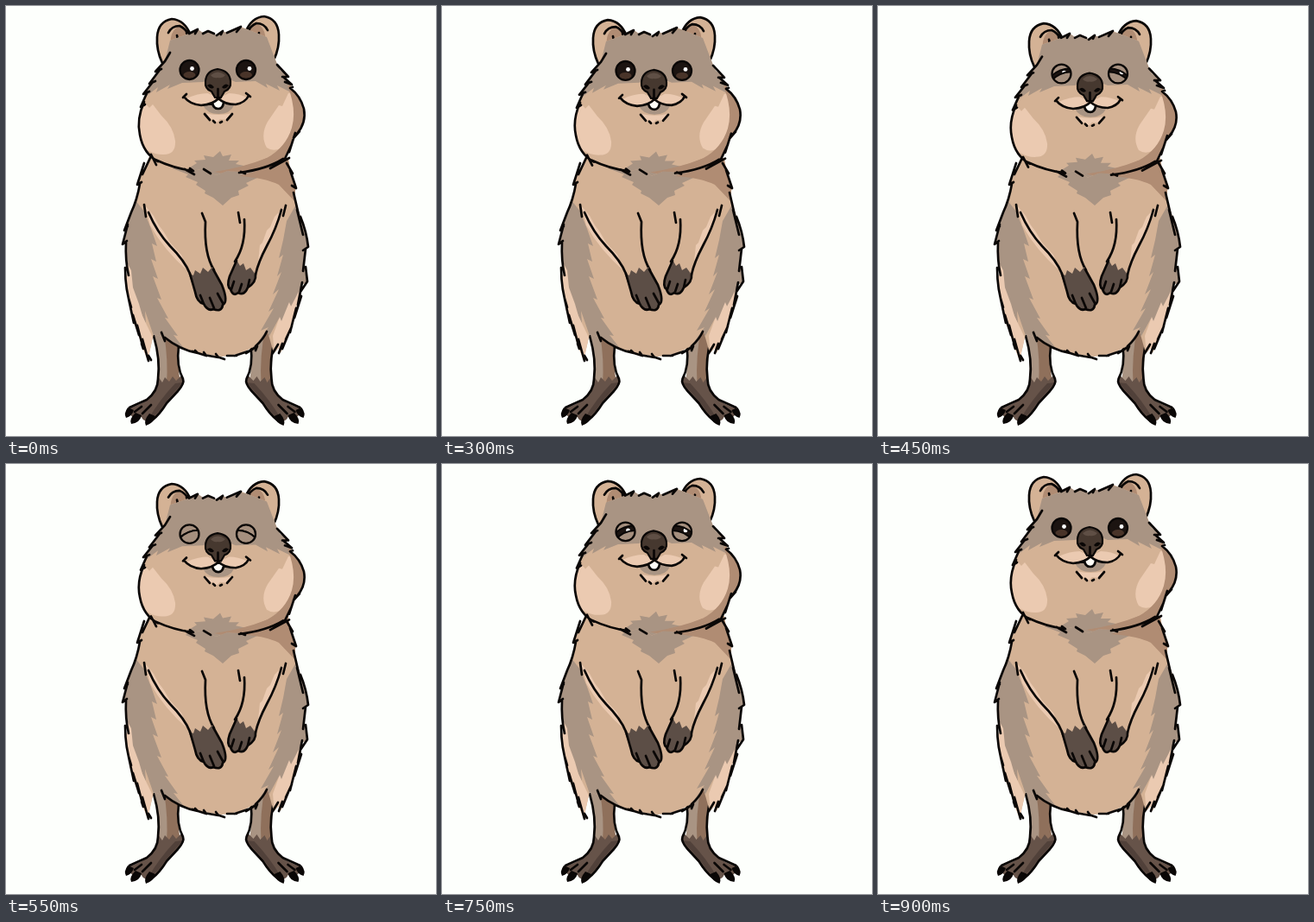
These frames come from a looping animation (498x498 px, 950 ms). An HTML page:

```html
<!DOCTYPE html>
<html lang="en">
<head>
<meta charset="utf-8">
<title>Blinking quokka</title>
<style>
  html, body { margin: 0; width: 100%; height: 100%; overflow: hidden; background: #fdfffc; }
  svg { display: block; width: 100vw; height: 100vh; }
  .ink { fill: none; stroke: #0a0706; stroke-width: 2.7; stroke-linecap: round; stroke-linejoin: round; }
  .tan { fill: #d4b295; }
  .grey { fill: #a99483; }
  .pink { fill: #ebcab1; }
  .shade { fill: #b08c73; }
  .dusk { fill: #8f705b; }
  .paw { fill: #5c4e46; }
  .foot { fill: #665349; }
  .sole { fill: #51413a; }
  .lid { fill: #a58f7e; stroke: #0a0706; stroke-width: 2; }
</style>
</head>
<body>
<svg viewBox="0 0 498 498">
  <defs>
    <path id="trunk" d="M167 172L157 196L151 207L155 206Q152 224 145 239L137 258L140 257L135 275L139 273Q138 295 141 310L139 313Q139 331 144 344L143 349L148 367L153 379L158 395L164 410L171 380L183 384Q205 402 250 406Q288 403 303 377L310 402L316 396L318 402L324 387L328 379L333 366L335 350L341 338L342 323L349 320L345 301L347 282L350 279Q348 261 340 241L334 221L336 208L329 189L327 176Z"/>
    <path id="skull" d="M184 64L173 75L178 74L166 89L171 88L160 101L164 101L156 116L160 115Q153 129 154 145Q155 169 176 180Q193 188 216 191L230 188L243 196L256 191L274 192Q304 188 321 179L332 158L334 149L339 147Q347 135 345 120Q341 104 329 95L331 91L323 85L327 82L317 74L313 65L302 36L272 24L256 31L250 29L245 34L233 29L228 31L222 27L212 32L190 40Z"/>
    <clipPath id="inTrunk"><use href="#trunk"/></clipPath>
    <clipPath id="inSkull"><use href="#skull"/></clipPath>
    <clipPath id="inEye"><circle r="11.4"/></clipPath>

    <path id="shin" d="M169 366Q178 407 175 438L202 438Q198 415 200 392V366Z"/>
    <g id="foot">
      <path class="foot" d="M176 429L181 436L184 430L189 435L193 429L197 434L203 428L206 436Q197 450 186 461Q176 478 168 480Q159 482 157 476Q147 479 144 473Q137 472 142 466Q169 458 174 441Z"/>
      <path class="sole" d="M205 436Q193 449 183 461Q175 475 165 478Q178 456 196 437Z"/>
      <path class="ink" d="M171 382Q179 410 176 432Q176 446 163 456L143 465M200 394Q197 417 205 432Q207 437 199 446L186 460Q178 473 169 480M158 472L168 462M149 470L157 464"/>
      <path d="M141 465Q136 472 139 477Q146 475 148 468ZM150 471Q142 479 145 484Q155 483 157 474ZM166 472Q159 480 162 486Q171 483 173 475Z" fill="#0a0706"/>
    </g>

    <g id="ear">
      <path class="tan" d="M182 67Q174 52 175 36Q176 19 192 15Q207 16 214 35L204 55Z"/>
      <path class="shade" d="M193 58Q186 32 199 24Q208 25 213 38L207 50Z"/>
      <path class="ink" d="M181 66Q174 51 175 36Q176 18 192 15Q207 16 214 34M188 31Q192 23 201 23Q208 26 211 33M198 34L200 44M204 39L207 50M209 31L214 42"/>
    </g>
  </defs>

  <rect width="498" height="498" fill="#fdfffc"/>

  <use href="#shin" class="grey"/>
  <path class="dusk" d="M183 380Q188 410 186 438H202Q198 415 200 392V380Z"/>
  <use href="#foot"/>
  <g transform="matrix(-1 0 0 1 483.5 0)">
    <use href="#shin" class="grey"/>
    <path class="dusk" d="M169 366Q178 407 175 438H188Q190 405 183 372Z"/>
    <use href="#foot"/>
  </g>

  <use href="#trunk" class="tan"/>
  <g clip-path="url(#inTrunk)">
    <path class="grey" d="M150 225L160 238L168 258L175 278L169 275L174 296L168 293L176 316L170 313L180 340L175 338L188 362L184 361L199 382L194 381L212 404L184 385L171 382L161 353L162 368L150 340L152 349L141 323L132 315L133 255Z"/>
    <path class="pink" d="M134 286L145 306L147 326L154 345L158 359L170 384L165 412L135 400Z"/>
    <path class="grey" d="M336 230L325 249L321 271L316 292L321 288L314 313L319 308L309 334L316 328L304 354L310 350L295 376L304 372L282 403L304 384L316 362L316 376L330 346L331 357L354 325V245Z"/>
    <path class="pink" d="M343 323L330 348L328 343L319 365L317 360L309 382L311 405L334 381Z"/>
    <path class="grey" d="M192 188L211 195L208 198L222 204L220 207L231 214L230 217L240 222L251 231L261 222L270 219L269 214L281 208L278 205L302 194L310 183Z"/>
    <path class="shade" d="M270 197Q300 199 316 207L337 229L334 205L326 176Q307 187 270 197Z"/>
    <path class="pink" d="M161 231L171 243L177 254L183 262L190 274L203 288L212 308Q183 283 167 254Z"/>
    <path class="pink" d="M322 233L311 244L306 256L302 260L297 274L294 277L291 306Q303 276 317 247Z"/>
  </g>

  <!-- trunk outline, broken where the fur parts -->
  <path class="ink" d="M167 176L158 195M160 182L152 207L157 204M155 206Q152 224 145 239L137 260L141 255M141 253L135 276L140 272M139 273Q138 295 142 312M138 303Q138 329 145 349M142 339L148 367M147 358L154 381M152 370L159 397L157 391M158 386L165 411M165 405L168 410M180 378L184 388M184 384Q201 398 222 402L219 399M216 400L232 405L229 401M229 404L246 407L243 403M247 407L253 409M256 405L267 405M265 405L280 400M278 402L291 394L289 399M289 394Q298 386 302 377M309 402L315 392M316 402L320 391M320 397L327 380M324 386L331 371M329 378L336 350M334 361L342 336M338 346L343 320M341 331L349 319L347 302M344 307L347 281M344 283L350 279Q348 261 341 244M344 265L337 236M339 242L333 216M331 208L336 211L329 190M332 194L325 182"/>

  <path class="ink" d="M160 230L162 244M165 239Q175 262 190 278Q207 295 213 310M227 240L231 250Q229 287 241 306M269 239L271 251M276 247Q278 277 265 296M324 231L321 243M319 236Q313 258 302 278Q292 297 289 311"/>
  <path class="paw" d="M211 309L217 312L219 306L225 310L228 303L234 308L239 302L249 321Q257 337 253 343Q252 354 244 352Q236 355 231 346Q221 345 219 331Z"/>
  <path class="ink" d="M213 310L219 331Q221 343 229 345Q234 354 240 351Q250 355 251 346Q258 343 250 323L240 305M229 345L225 335M241 350L236 338M251 344L245 333"/>
  <path class="paw" d="M267 294L271 301L275 298L278 306L283 303L289 311Q289 321 280 326Q277 335 270 332Q263 337 260 329Q255 326 259 313Z"/>
  <path class="ink" d="M267 295L259 313Q255 325 260 328Q263 337 269 332Q276 336 280 326Q290 320 289 311M261 328L264 319M270 331L273 322M280 326L282 317"/>

  <g id="head">
    <use href="#ear"/>
    <use href="#ear" transform="matrix(-1 0 0 1 491 -3)"/>
    <use href="#skull" class="tan"/>
    <g clip-path="url(#inSkull)">
      <path class="grey" d="M190 30L174 70L158 108L176 94L174 100L190 91L187 96L204 89L228 88L246 80L266 88L289 87L303 95L301 90L317 98L314 92L334 102L320 75L300 30L240 20Z"/>
      <path class="pink" d="M159 110L166 118L170 114L180 127Q194 140 196 156Q197 172 183 172Q162 173 150 150V118Z"/>
      <path class="pink" d="M327 101L320 116L316 115L303 134Q294 150 302 164Q313 172 329 157L347 130V102Z"/>
      <path class="shade" d="M240 192Q280 187 302 176Q324 164 331 141Q337 120 326 92L352 92V150L325 184L270 198Z"/>
      <path class="grey" d="M205 192L221 182L218 179L231 178L229 173L240 175L248 168L251 174L261 172L258 179L270 179L266 183L280 186L251 200Z"/>
      <path class="shade" d="M241 192Q275 187 302 176L304 188L270 198Z"/>
    </g>
    <path class="ink" d="M190 54L184 64L173 76L180 73M178 74L166 90L173 87M170 88L159 102L166 99M163 101L156 117L161 114M160 111Q151 131 155 149Q159 171 176 180M168 172L174 184M173 178Q194 188 217 191L213 188M207 189L218 195M229 189L237 194M272 192L277 194M270 193Q302 189 321 177M306 188L328 176M322 179L331 160M328 169L335 147M333 153L340 145M337 148Q348 135 345 119Q341 104 329 95L332 94M323 88L331 91L321 82M320 82L327 82L314 68M212 32L222 27L219 32M228 32L234 29L241 32M244 34L251 29L249 33M256 31L272 24L267 30"/>

    <g id="face">
      <path class="pink" d="M209 107Q222 101 234 101L246 107L258 101Q270 101 281 107Q272 116 258 114L246 108L234 114Q219 116 209 107Z"/>
      <path class="grey" d="M228 115L238 113H254L264 115Q260 125 246 125Q233 125 228 115Z"/>
      <path class="pink" d="M230 124Q246 128 262 124L256 132L248 131L244 135L240 131L235 132Z"/>
      <path d="M239 111Q246 108 252 111Q251 119 246 119Q240 119 239 111Z" fill="#fffdf7"/>
      <path class="ink" d="M205 106L209 102M206 105Q213 114 226 115Q240 114 246 107Q253 114 266 114Q277 112 281 104M278 101L283 105M239 112Q240 119 246 119Q251 119 252 112M230 125L236 132M240 133L242 135M248 135L250 134M262 125L256 132"/>
      <path d="M231 87Q232 75 245 73Q259 75 260 87Q261 96 253 99L249 106H242L238 99Q230 96 231 87Z" fill="#46382f" stroke="#0a0706" stroke-width="2.2"/>
      <path d="M237 80Q245 73 254 80Q251 84 245 83Q240 84 237 80Z" fill="#5f4f45"/>
      <path d="M233 92Q237 88 241 94Q238 98 233 92ZM258 92Q254 88 250 94Q253 98 258 92Z" fill="#0a0706"/>
      <path class="ink" d="M245.500 96V107"/>
      <g id="eyes"></g>
    </g>
  </g>
</svg>
<script>
  const LOOP = 950, STEP = 50, BASE = 370;
  const $ = id => document.getElementById(id);

  const eye = (x, y, tilt, glint) => `
    <g transform="translate(${x} ${y})">
      <g clip-path="url(#inEye)">
        <circle r="12" fill="#1c1411"/>
        <ellipse cy="6" rx="7" ry="4" fill="#493429"/>
        <circle cx="${glint}" cy="-1.500" r="2.4" fill="#fff"/>
        <g transform="rotate(${tilt})">
          <path class="lid upper" d="M-16 -30H16V0Q0 -9 -16 0Z"/>
          <path class="lid lower" d="M-16 30H16V0Q0 -9 -16 0Z"/>
        </g>
      </g>
      <circle r="11" class="ink" style="stroke-width:2.3"/>
    </g>`;
  $('eyes').innerHTML = eye(212.5, 74, -22, 3) + eye(278, 74, 22, 4);

  const uppers = document.querySelectorAll('.upper');
  const lowers = document.querySelectorAll('.lower');
  const shift = (parts, y) => parts.forEach(p => p.setAttribute('transform', `translate(0 ${y})`));

  // 0 = upright, 1 = head fully sunk: slow start down, quicker return
  function sink(t) {
    if (t < 100 || t >= 900) return 0;
    const a = t < 600 ? ((t - 100) / 500) ** 1.6 : 1 - ((t - 600) / 300) ** 1.15;
    return Math.sin(a * Math.PI / 2) ** 2;
  }

  function draw(now) {
    const t = Math.floor(now % LOOP / STEP) * STEP;
    const p = sink(t);
    const shut = Math.min(1, Math.max(0, (p - .25) / .4));
    const squash = 1 - .024 * p;
    $('head').setAttribute('transform', `matrix(1 0 0 ${squash} 0 ${BASE * (1 - squash)})`);
    $('face').setAttribute('transform', `translate(0 ${p * .5})`);
    shift(uppers, -13 + 15 * shut);
    shift(lowers, 20 - 18 * shut);
  }

  const start = performance.now();
  function tick() {
    draw(performance.now() - start);
    requestAnimationFrame(tick);
  }
  tick();
</script>
</body>
</html>
```
